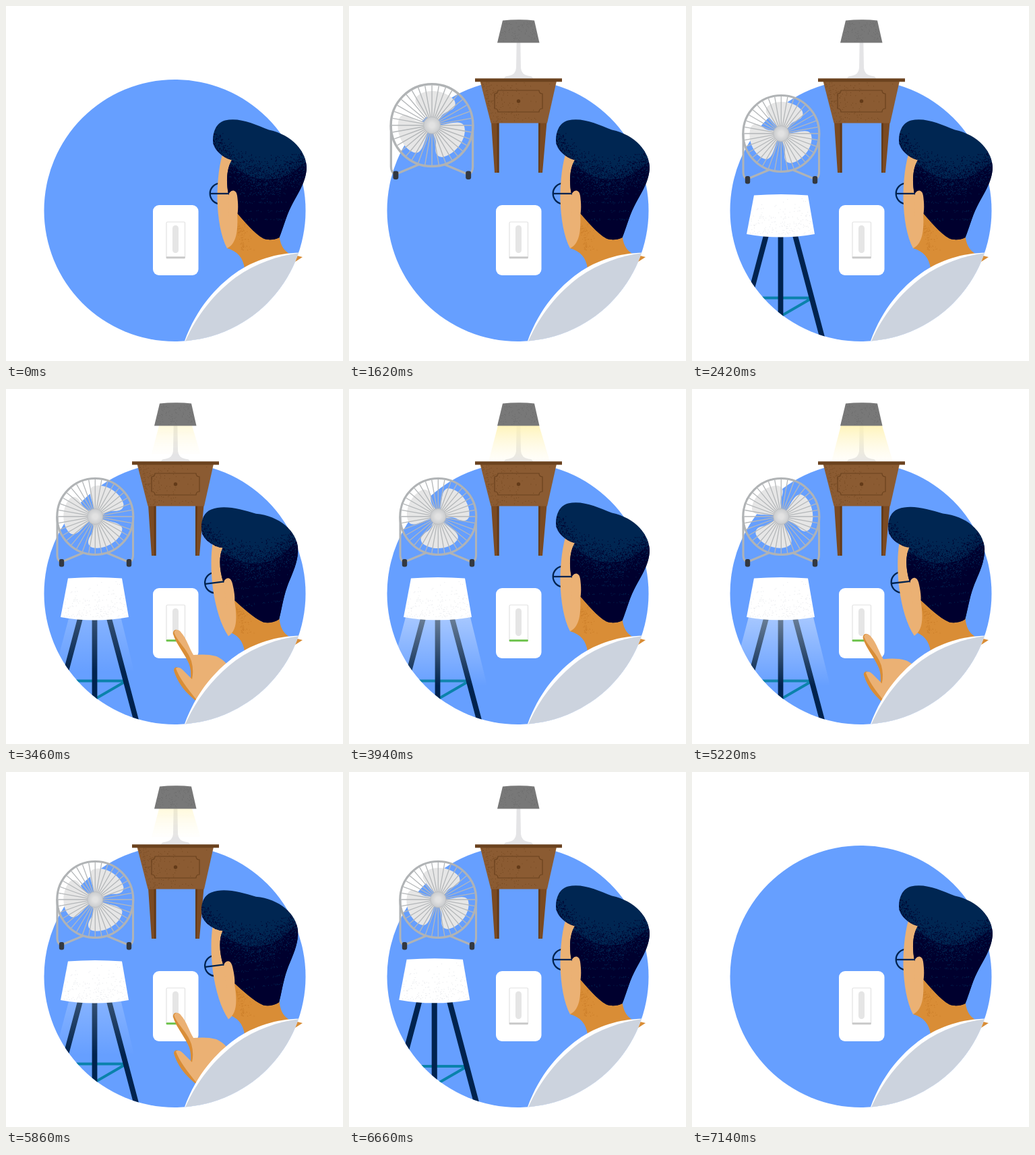
Recreate the animation shown at these times as an HTML page. Size 500x526 px, loop 7.22 s.

```html
<!DOCTYPE html>
<html lang="en">
<head>
<meta charset="utf-8">
<title>Smart switch</title>
<style>
html, body { margin: 0; width: 100%; height: 100%; overflow: hidden; background: #fff; }
svg { display: block; width: 500px; height: 526px; }
</style>
</head>
<body>
<svg viewBox="0 0 500 526" xmlns="http://www.w3.org/2000/svg">
  <defs>
    <clipPath id="disc"><circle cx="250.5" cy="303" r="194"/></clipPath>
    <path id="hairShape" d="M307 200C307 186 312 173 325 169.500C346 164.500 369 175 390 183.500C425 191 446 216 446 240C445 262 432 279 423 297C415 313 411 330 405.500 343C398 347 388 347 382 344.500C368 337 353 318 343 307L330 279C326 258 328 240 335 228C325 227 307 213 307 200Z"/>
    <clipPath id="hairClip"><use href="#hairShape"/></clipPath>
    <path id="shadeShape" d="M92 280.500Q132 277.500 172 280.500L182 338Q131 347 81 338Z"/>
    <linearGradient id="warm" x1="0" y1="0" x2="0" y2="1">
      <stop offset="0" stop-color="#fff2ae"/><stop offset="1" stop-color="#fff8dc" stop-opacity=".15"/>
    </linearGradient>
    <linearGradient id="cool" x1="0" y1="0" x2="0" y2="1">
      <stop offset="0" stop-color="#fff" stop-opacity=".42"/><stop offset="1" stop-color="#fff" stop-opacity="0"/>
    </linearGradient>
    <radialGradient id="hubFill"><stop offset=".3" stop-color="#e2e2e2"/><stop offset="1" stop-color="#c9cbcd"/></radialGradient>
    <path id="blade" d="M-4 -7C-13 -20 -26 -29 -22 -38C-12 -51 18 -50 31 -34C35 -25 28 -21 20 -18C12 -14 10 -8 7 -3Z"/>
  </defs>

  <circle cx="250.5" cy="303" r="194" fill="#669fff"/>

  <g clip-path="url(#disc)"><g id="floor">
    <path d="M86 432.500H174M88 436L131 460L176 434" fill="none" stroke="#0a82ab" stroke-width="3.800"/>
    <path d="M110 340L86 430M131.500 340V500M153 340L194 494" fill="none" stroke="#00234f" stroke-width="7.800"/>
    <g id="floorGlow"><path d="M84 338Q131 347 180 338L205 440H57Z" fill="url(#cool)"/></g>
    <use href="#shadeShape" fill="#fff"/>
    <path id="shadeDots" stroke="#e4e6ea" stroke-width="1"/>
  </g></g>

  <g id="fan">
    <g fill="none" stroke="#b0b3b5" stroke-width="3">
      <path d="M76 189V246Q76 254 82 257M188.500 189V246Q188.500 254 183 257M83 256L114 243M181 256L150 243"/>
    </g>
    <g id="blades" fill="#e6e6e6">
      <use href="#blade"/><use href="#blade" transform="rotate(120)"/><use href="#blade" transform="rotate(240)"/>
    </g>
    <path id="spokes" fill="none" stroke="#b4b7b9" stroke-width="1.300"/>
    <circle cx="132.300" cy="189" r="56.500" fill="none" stroke="#b0b3b5" stroke-width="3.200"/>
    <circle cx="132.300" cy="189" r="11.500" fill="url(#hubFill)" stroke="#bbbdbf" stroke-width=".8"/>
    <rect x="78.800" y="252" width="7.400" height="11.500" rx="3" fill="#333840"/>
    <rect x="178.800" y="252" width="7.400" height="11.500" rx="3" fill="#333840"/>
  </g>

  <g id="table">
    <path d="M248.700 52H254.300L255 92Q256 102 266 103.500Q273 104 273 107.500H230Q230 104 237 103.500Q247 102 248 92Z" fill="#e4e4e6"/>
    <g id="tableGlow"><path d="M221 54H282L298 107.500H207Z" fill="url(#warm)" opacity=".85"/></g>
    <path d="M228 21.500Q251 19 275 21.500L282.500 54.500H220Z" fill="#787878"/>
    <path id="lampDots" stroke="#6b6b6b" stroke-width="1"/>
    <path d="M211 172H222.500V247H216ZM281 172H293.500L287 247H281Z" fill="#7a4a22"/>
    <path d="M219.500 173L220 247H222.500V173ZM284 173L282.500 247H281V173Z" fill="#633a18"/>
    <path d="M194.500 111H308L294 173.500H210.500Z" fill="#8b5b32"/>
    <path id="woodDots" stroke="#744820" stroke-width="1"/>
    <rect x="187" y="107.300" width="129" height="5" fill="#6b421e"/>
    <path d="M221 125H282Q282 130 287 130V152Q282 152 282 157H221Q221 152 216 152V130Q221 130 221 125Z" fill="none" stroke="#6b421e" stroke-width="1.200"/>
    <circle cx="251.500" cy="141" r="2.700" fill="#633a18"/>
  </g>

  <rect x="218" y="295" width="67.500" height="104" rx="9" fill="#fff"/>
  <rect x="238" y="320" width="27.500" height="53.500" rx="1.500" fill="#fff" stroke="#e2e2e2" stroke-width="1.200"/>
  <rect id="led" x="237.700" y="371.300" width="28" height="3" rx="1"/>
  <rect x="247" y="325" width="9" height="41" rx="4.500" fill="#e5e5e5"/>

  <path d="M340 300L385 340L405.500 338C406 352 411 361 420 367L440 372L380 410L354 389C352 373 343 363 328 359Z" fill="#d98d36"/>
  <path id="neckDots" stroke="#c97c28" stroke-width="1"/>
  <g id="head">
    <circle cx="318" cy="278" r="15.300" fill="none" stroke="#00234f" stroke-width="2.300"/>
    <path d="M321 220C316 238 313.500 260 313.500 285C314 315 319 342 328 359C340 353 345 338 343 306L348 240L332 215Z" fill="#ebb174"/>
    <use href="#hairShape" fill="#002652"/>
    <g clip-path="url(#hairClip)">
      <path d="M300 198Q378 300 450 226V360H300Z" fill="#00002e"/>
      <path id="darkDots" stroke="#00002e" stroke-width="1.100"/>
      <path id="navyDots" stroke="#002652" stroke-width="1.100"/>
    </g>
    <path d="M330 281C331 273 341 269 343 281C344.500 292 345 304 342.500 312L331 312Z" fill="#ebb174"/>
    <path d="M303 278H331" stroke="#00234f" stroke-width="2.300"/>
  </g>

  <g clip-path="url(#disc)">
    <g id="hand">
      <path d="M248 363C247 356 255 354 258 361L278 395L330 410L330 470L284 464C267 450 255 437 249 417C249 411 256 411 259 416L274 428Q275 413 270 404C263 389 252 377 248 363Z" fill="#d98d36"/>
      <path d="M249.500 361C250 355.500 257 356 260 361C268 370 272 384 278 394C290 393 302 393 312 396Q321 400 327 407L340 440L300 480L284 462C272 447 259 432 252 414C256 411 260 414 263 417L276 430Q279 417 275 403C269 385 254 374 249.500 361Z" fill="#ebb174"/>
    </g>
    <path d="M264 499C282 448 312 416 340 396C368 376 402 366 436 365.500L470 520H264Z" fill="#fff"/>
    <path d="M265 499C282 459 309 426 341 402C371 381 403 370 436 366L470 520H265Z" fill="#ccd3de"/>
  </g>
</svg>
<script>
const $ = id => document.getElementById(id);
const LOOP = 7220, START = 1300, STEP = 80;
const SPIN = 24; // degrees per step

let seed = 7;
const rnd = () => (seed = seed * 16807 % 2147483647) / 2147483647;
const bell = () => rnd() + rnd() + rnd() - 1.5;
const dot = (x, y) => `M${x.toFixed(1)} ${y.toFixed(1)}h1`;

function scatter(id, count, place) {
  let d = '';
  for (let i = 0; i < count; i++) d += dot(...place());
  $(id).setAttribute('d', d);
}

// Hair grain follows the edge between the two tones.
function hairEdge(side) {
  return () => {
    const u = rnd(), v = 1 - u;
    const x = 300 * v * v + 756 * u * v + 450 * u * u;
    const y = 198 * v * v + 600 * u * v + 226 * u * u;
    return [x, y + side * Math.abs(bell()) * 26];
  };
}
scatter('darkDots', 900, hairEdge(-1));
scatter('navyDots', 750, () => rnd() < .85 ? hairEdge(1)()
  : [345 + rnd() * 70, 278 + Math.floor(rnd() * 4) * 13 + bell() * 2]);
scatter('shadeDots', 170, () => {
  const v = Math.sqrt(rnd());
  return [91 - 7 * v + rnd() * (80 + 15 * v), 284 + 54 * v];
});
scatter('lampDots', 110, () => {
  const v = rnd();
  return [228 - 7 * v + rnd() * (46 + 13 * v), 24 + 29 * v];
});
scatter('woodDots', 150, () => {
  const v = rnd();
  return [197 + 15 * v + rnd() * rnd() * (106 - 26 * v), 113 + 59 * v];
});
scatter('neckDots', 110, () => {
  const v = rnd();
  return [341 + v * 8 + rnd() * rnd() * 22, 322 + v * 40];
});

let spokes = '';
for (let i = 0; i < 36; i++) {
  const a = i * Math.PI / 18, c = Math.cos(a), s = Math.sin(a);
  spokes += `M${132.3 + 11 * c} ${189 + 11 * s}L${132.3 + 55 * c} ${189 + 55 * s}`;
}
$('spokes').setAttribute('d', spokes);

// Value of a stepped track: it holds its last value.
function track(t, start, values, before) {
  const i = Math.round((t - start) / STEP);
  return i < 0 ? before : values[Math.min(i, values.length - 1)];
}

const items = {
  table: [1300, [.32, .78, .96, 1], 6820, [1.025, .8, .45, .2, 0]],
  fan: [1460, [.4, .85, 1.078, 1.035, 1], 6740, [1.07, .8, .4, 0]],
  floor: [1700, [.4, .85, 1.05, 1.02, 1], 6660, [1.04, .8, .4, 0]]
};

const reach = [0, .25, .7, .93, 1], back = [1, .75, .35, .08, 0];
function pressAt(t) {
  if (t < 3460) return track(t, 2420, reach, 0);
  if (t < 4980) return track(t, 3460, back, 1);
  return t < 5860 ? track(t, 4980, reach, 0) : track(t, 5860, back, 1);
}

const lightAt = t => t < 5860
  ? track(t, 3460, [.5, .8, 1], 0)
  : track(t, 5860, [.5, .2, 0], 1);

function put(id, transform) { $(id).setAttribute('transform', transform); }

function glow(id, x, y, light) {
  const sx = .6 + .4 * light;
  put(id, `translate(${x} ${y}) scale(${Math.max(sx, .8)} ${sx}) translate(${-x} ${-y})`);
  $(id).setAttribute('opacity', light);
}

function draw(ms) {
  const t = ms < START ? 0 : START + Math.floor((ms - START) / STEP) * STEP;

  for (const id in items) {
    const [from, grow, to, shrink] = items[id];
    const s = t < to ? track(t, from, grow, 0) : track(t, to, shrink, 1);
    $(id).style.display = s ? '' : 'none';
    put(id, `translate(251 347) scale(${s}) translate(-251 -347)`);
  }

  const turns = Math.max(0, Math.min(35, (t - 3380) / STEP));
  put('blades', `translate(132.3 189) rotate(${turns * SPIN})`);

  const light = lightAt(t);
  glow('tableGlow', 251.5, 54, light);
  glow('floorGlow', 131.5, 338, light);
  $('led').setAttribute('fill', light ? '#6cc24a' : '#c9c9c9');

  const p = pressAt(t);
  put('head', `rotate(${-6.8 * p} 390 346)`);
  put('hand', `translate(${82 * (1 - p)} ${88 * (1 - p)})`);
  $('hand').style.display = p ? '' : 'none';
}

const begin = performance.now();
function tick() {
  draw((performance.now() - begin) % LOOP);
  requestAnimationFrame(tick);
}
tick();
</script>
</body>
</html>
```
